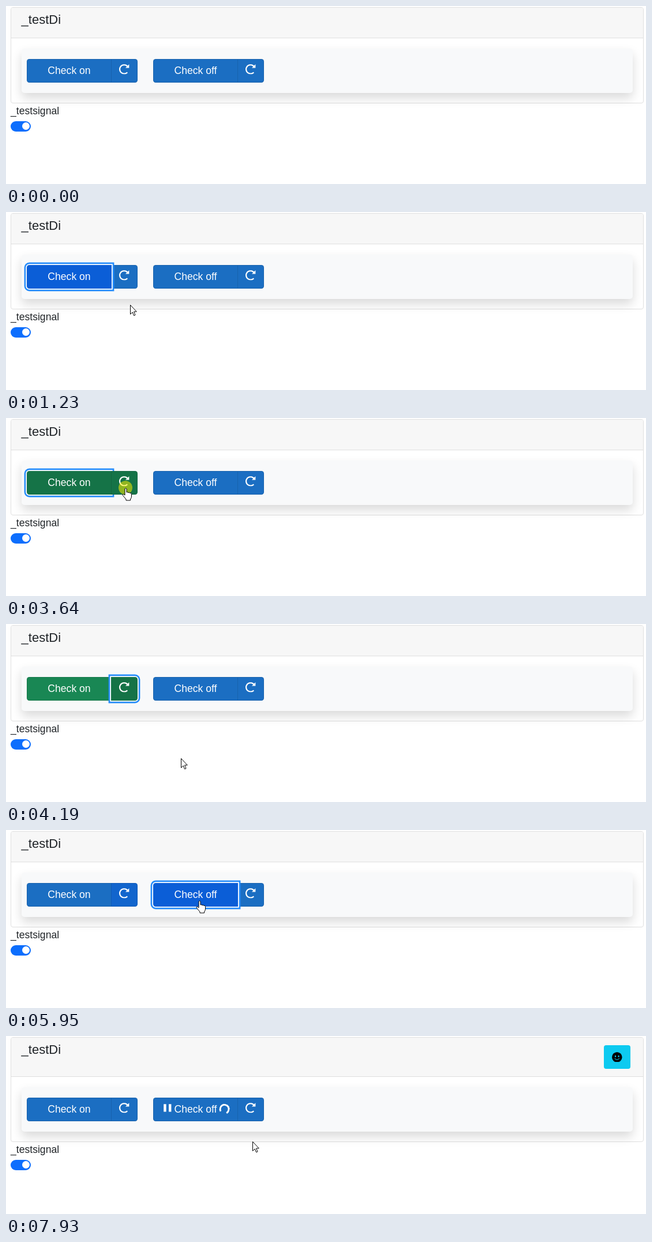
An HTML page that plays this animation: 1109x309 px, repeating every 7.99 s.

```html
<!DOCTYPE html>
<html lang="en">
<head>
<meta charset="utf-8">
<title>Check buttons</title>
<style>
  html, body { margin: 0; width: 100%; height: 100%; overflow: hidden; background: #fff; }
  body { position: relative; font: 17.6px/20px "Liberation Sans", Arial, sans-serif; color: #212529; }
  div, svg { position: absolute; box-sizing: border-box; white-space: pre; }
  .card { left: 8px; top: 2px; width: 1097px; height: calc(167px + var(--shift)); border: 1px solid #dfdfdf; border-radius: 4px; }
  .header { left: 0; top: 0; width: 100%; height: calc(53px + var(--shift)); background: #f7f7f7; border-bottom: 1px solid #dfdfdf; border-radius: 3px 3px 0 0; }
  .title { left: 26.6px; top: 11px; font-size: 22px; line-height: 25px; }
  .smile { left: 1036px; top: 16px; width: 46px; height: 41px; background: #0dcaf0; border-radius: 4px; }
  .smile svg { left: 14.2px; top: 11.7px; }
  .content { left: 0; top: var(--shift); }
  .panel { left: 27px; top: 74px; width: 1059px; height: 77px; background: #f8f9fa; border-radius: 5px; box-shadow: 0 8.8px 17.6px rgba(0, 0, 0, .15); }
  .button { top: 92px; height: 41px; line-height: 40px; color: #fff; text-align: center; box-shadow: inset 0 0 0 1px rgba(0, 0, 0, .11); }
  .button.focus { box-shadow: 0 0 0 1.76px #fff, 0 0 0 4.4px #258cfb; }
  .main { width: 147px; border-radius: 4.4px 0 0 4.4px; }
  .reload { width: 46px; border-radius: 0 4.4px 4.4px 0; }
  .reload svg { left: 14.2px; top: 9.3px; }
  .pause { left: 16.2px; top: 9.1px; }
  .spinner { left: 114.8px; top: 11.2px; width: 17.6px; height: 17.6px; border: 3px solid #fff; border-right-color: transparent; border-radius: 50%; }
  .label { left: 8px; top: 172px; }
  .switch { left: 8px; top: 200px; width: 35.2px; height: 17.6px; border-radius: 9px; background: #0d6efd; }
  .knob { right: 2.2px; top: 2.2px; width: 13.2px; height: 13.2px; border-radius: 50%; background: #fff; }
  .press { left: -12px; top: -12px; width: 24px; height: 24px; border-radius: 50%; background: rgba(255, 240, 0, .53); }
  #cursor { left: 0; top: 0; z-index: 5; }
  #cursor svg { left: 0; top: 0; overflow: visible; fill: #fff; stroke: #000; stroke-linejoin: round; }
</style>
</head>
<body style="--shift: 0px">
<svg width="0" height="0">
  <symbol id="reloadIcon" viewBox="0 0 8 8">
    <path fill="#fff" d="M4 0c-2.2 0-4 1.8-4 4s1.8 4 4 4c1.1 0 2.12-.43 2.84-1.16l-.72-.72c-.54.54-1.29.88-2.13.88-1.66 0-3-1.34-3-3s1.34-3 3-3c.83 0 1.55.36 2.09.91l-1.09 1.09h3v-3l-1.19 1.19c-.72-.72-1.71-1.19-2.81-1.19z"/>
  </symbol>
</svg>
<div class="card"><div class="header"></div></div>
<div class="title">_testDi</div>
<div class="smile" id="smile">
  <svg width="17.6" height="17.6" viewBox="0 0 16 16">
    <circle cx="8" cy="8" r="8"/>
    <g fill="#0dcaf0"><ellipse cx="5.5" cy="6.5" rx="1" ry="1.5"/><ellipse cx="10.5" cy="6.5" rx="1" ry="1.5"/></g>
    <path d="M4.6 10Q8 14 11.4 10" fill="none" stroke="#0dcaf0" stroke-linecap="round"/>
  </svg>
</div>
<div class="content">
  <div class="panel"></div>
  <div class="button main" id="checkOn" style="left:36px">Check on</div>
  <div class="button reload" id="reloadOn" style="left:182px"><svg width="17.6" height="17.6"><use href="#reloadIcon"/></svg></div>
  <div class="button main" id="checkOff" style="left:255px">Check off<div id="busy" style="left:0;top:0"><svg class="pause" width="17.6" height="17.6" viewBox="0 0 8 8"><path fill="#fff" d="M1 1h2v6H1zM5 1h2v6H5z"/></svg><div class="spinner" id="spinner"></div></div></div>
  <div class="button reload" id="reloadOff" style="left:401px"><svg width="17.6" height="17.6"><use href="#reloadIcon"/></svg></div>
  <div class="label">_testsignal</div>
  <div class="switch"><div class="knob"></div></div>
</div>
<div id="cursor">
  <div class="press" id="press"></div>
  <svg id="arrow" width="12" height="20"><path d="M.5 .5V16.5L4.2 13L6.6 18.8L9 17.8L6.6 12H11.3Z"/></svg>
  <svg id="hand" width="18" height="23"><path transform="translate(-6 0)" d="M5 2q1.5-2.4 3 0V8q1.5-1 3 .5q1.5-.7 3 .8q2-.5 2.5 1.2V15q0 3-2 5V22H7V20L1.5 13.5Q.3 11.5 2.3 11L5 13Z"/></svg>
</div>
<script>
const LOOP = 7990, STEP = 69, FADE = 180;
const BLUE = [27, 110, 194], BLUE_DARK = [11, 94, 215];
const GREEN = [25, 135, 84], GREEN_DARK = [21, 115, 71];

// The screen refreshes in steps, counted from the start of each activity.
const activities = [0, 190, 1960, 3230, 4050, 4920, 5390, 7030];

// time, x, y of the pointer tip
const path = [
  [190, 863, 242], [400, 690, 215], [600, 400, 160], [800, 170, 126], [880, 118, 122],
  [1018, 118, 122], [1087, 130, 128], [1156, 185, 150], [1225, 215, 161],
  [3161, 215, 161], [3437, 207, 121], [3981, 207, 121], [4050, 225, 150], [4119, 280, 212], [4188, 303, 233],
  [5321, 303, 233], [5528, 320, 180], [5735, 335, 122], [6011, 335, 122],
  [6080, 342, 128], [6149, 356, 138], [6218, 398, 168], [6287, 427, 183]
];
const presses = [949, 3640, 5804];

// Each button fades to a new colour from the given time.
const buttons = {
  checkOn: { x: 36, w: 147, focus: [1010, 3710], fades: [[0, BLUE], [820, BLUE_DARK], [1950, GREEN_DARK], [3700, GREEN], [4880, BLUE]] },
  reloadOn: { x: 182, w: 46, focus: [3710, 5870], fades: [[0, BLUE], [1950, GREEN], [3380, GREEN_DARK], [4880, BLUE_DARK], [5860, BLUE]] },
  checkOff: { x: 255, w: 147, focus: [5870, 7030], fades: [[0, BLUE], [5690, BLUE_DARK], [7029, BLUE, 1]] },
  reloadOff: { x: 401, w: 46, focus: [0, 0], fades: [[0, BLUE]] }
};

const el = id => document.getElementById(id);
const show = (id, on) => { el(id).style.visibility = on ? "visible" : "hidden"; };
const within = (t, [from, to]) => t >= from && t < to;
const mix = (a, b, p) => a.map((v, i) => v + (b[i] - v) * p);

function stepped(t) {
  const start = activities.filter(a => a <= t).pop();
  return Math.max(start, start + Math.floor((t - start + 7) / STEP) * STEP);
}

function pointerAt(t) {
  const next = path.findIndex(k => k[0] > t);
  if (next < 0) return path[path.length - 1].slice(1);
  if (next === 0) return path[0].slice(1);
  const a = path[next - 1], b = path[next];
  return mix(a, b, (t - a[0]) / (b[0] - a[0])).slice(1);
}

function colourAt(fades, t) {
  let colour = fades[0][1];
  for (const [start, target, time = FADE] of fades) {
    if (t >= start) colour = mix(colour, target, Math.min(1, (t - start) / time));
  }
  return `rgb(${colour.map(Math.round)})`;
}

function draw(now) {
  const t = now % LOOP, s = stepped(t);
  const [x, y] = pointerAt(s);
  const visible = t >= 190;
  let overButton = false;

  for (const [id, b] of Object.entries(buttons)) {
    const over = visible && x >= b.x && x < b.x + b.w && y >= 92 && y < 133;
    const focus = within(s, b.focus);
    overButton = overButton || over;
    el(id).classList.toggle("focus", focus);
    el(id).style.zIndex = over || focus ? 1 : 0;
    el(id).style.background = colourAt(b.fades, s);
  }

  el("cursor").style.transform = `translate(${Math.round(x)}px, ${Math.round(y)}px)`;
  show("arrow", visible && !overButton);
  show("hand", visible && overButton);
  show("press", presses.some(p => within(s, [p, p + 2 * STEP - 5])));

  show("busy", t >= 7030);
  el("spinner").style.transform = `rotate(${5 + (s - 7030) / 700 * 360}deg)`;

  const alerted = t >= 7860;
  show("smile", alerted);
  document.body.style.setProperty("--shift", alerted ? "15px" : "0px");
}

const begin = performance.now();
function tick() {
  draw(performance.now() - begin);
  requestAnimationFrame(tick);
}
tick();
</script>
</body>
</html>
```
